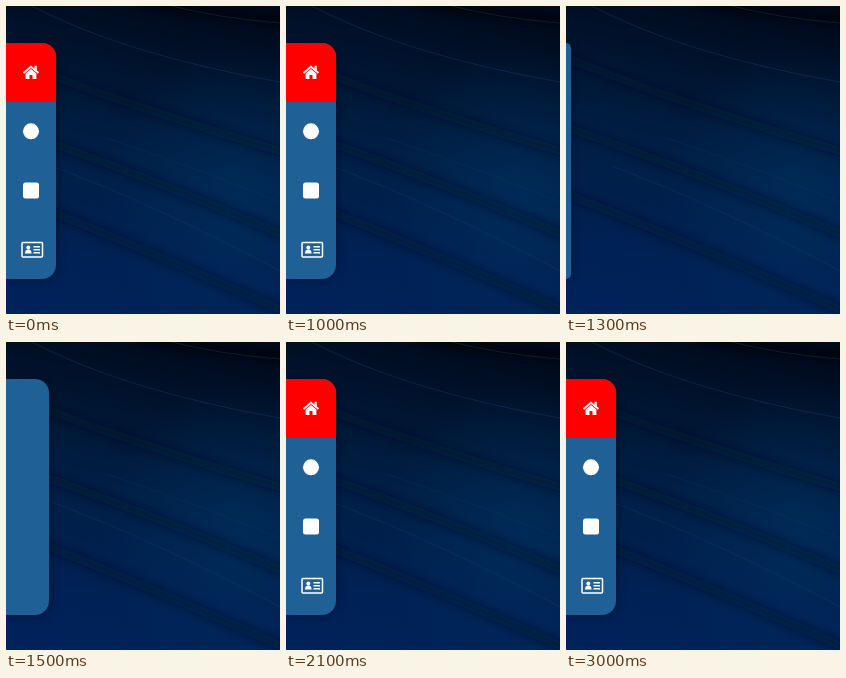
Animation of 274x308 px, one loop 3200 ms. Source, as an HTML page:

```html
<!DOCTYPE html>
<html lang="en">
<head>
<meta charset="utf-8">
<title>Sidebar</title>
<style>
  html, body { margin: 0; width: 100%; height: 100%; overflow: hidden; background: #fefefe; }
  #page { position: absolute; left: 0; top: 0; width: 274px; height: 308px; overflow: hidden; }
  svg { position: absolute; left: 0; top: 0; }
  #bar {
    position: absolute; left: 0; top: 37px; width: 50px; height: 236px; overflow: hidden;
    border-radius: 0 14px 14px 0; background: #1f6096; box-shadow: 0 0 9px rgba(0, 8, 28, .6);
  }
</style>
</head>
<body>
<div id="page">
  <svg width="274" height="308">
    <defs>
      <linearGradient id="sky" x1=".6" y1="0" x2=".42" y2="1">
        <stop offset="0" stop-color="#000a1c"/>
        <stop offset=".22" stop-color="#00142f"/>
        <stop offset=".5" stop-color="#001f45"/>
        <stop offset="1" stop-color="#00225a"/>
      </linearGradient>
      <radialGradient id="glow" cx=".86" cy=".62" r=".5">
        <stop offset="0" stop-color="#003262" stop-opacity=".6"/>
        <stop offset="1" stop-color="#003262" stop-opacity="0"/>
      </radialGradient>
      <filter id="soft" x="-20%" y="-20%" width="140%" height="140%"><feGaussianBlur stdDeviation="4"/></filter>
    </defs>
    <rect width="274" height="308" fill="url(#sky)"/>
    <rect width="274" height="308" fill="url(#glow)"/>
    <g fill="none" filter="url(#soft)" stroke="#000e2c" stroke-opacity=".55" stroke-width="9">
      <path d="M-10 48Q120 100 284 148"/>
      <path d="M-10 118Q130 165 284 232"/>
      <path d="M-10 184Q110 230 284 308"/>
      <path d="M130 -4Q200 8 284 14" stroke="#00040c"/>
    </g>
    <g fill="none" stroke="#2b5078" stroke-opacity=".3">
      <path d="M20 -3Q115 48 274 76"/>
      <path d="M158 -2Q210 12 274 17"/>
      <path d="M46 160Q150 199 274 265" stroke-opacity=".2"/>
      <path d="M100 132Q180 158 274 196" stroke-opacity=".12"/>
    </g>
  </svg>
  <div id="bar">
    <svg id="menu" width="50" height="236" fill="#fff">
      <rect width="50" height="59" fill="#f00"/>
      <path d="M17.5 30 25 23.7 32.5 30" fill="none" stroke="#fff" stroke-width="1.8"/>
      <path d="M28.5 22.8h2.3v5h-2.3zM19.6 30.4 25 25.9l5.4 4.5V36h-3.9v-4h-3v4h-3.9z"/>
      <circle cx="25" cy="88.3" r="8"/>
      <rect x="17" y="139.500" width="16" height="16" rx="2.500"/>
      <rect x="16" y="199.500" width="20.500" height="14.500" rx="1" fill="none" stroke="#fff" stroke-width="1.500"/>
      <circle cx="22.300" cy="204.500" r="2"/>
      <path d="M19 210.500q0-4 3.300-4t3.300 4zM27.500 203h6.500v1.500h-6.500zM27.500 206h6.500v1.500h-6.500zM27.500 209h6.500v1.500h-6.500z"/>
    </svg>
  </div>
</div>
<script>
  const LOOP = 3200, BLANK = 1200, RELOAD = 1300;
  const [page, bar, menu] = ['page', 'bar', 'menu'].map(id => document.getElementById(id));
  const clamp = x => Math.min(1, Math.max(0, x));

  // cubic-bezier(.25, .1, .25, 1), solved by bisection
  function ease(x) {
    const curve = (a, b, s) => 3 * a * s * (1 - s) ** 2 + 3 * b * s * s * (1 - s) + s ** 3;
    let lo = 0, hi = 1;
    for (let i = 0; i < 20; i++) {
      const mid = (lo + hi) / 2;
      if (curve(.25, .25, mid) < x) lo = mid; else hi = mid;
    }
    return curve(.1, 1, hi);
  }
  const progress = (t, start, length) => ease(clamp((t - start) / length));

  function draw(now) {
    const t = now % LOOP, settled = t < BLANK;
    page.style.visibility = !settled && t < RELOAD ? 'hidden' : 'visible';
    bar.style.width = 50 * (settled ? 1 : progress(t, 1257, 430)) + 'px';
    menu.style.opacity = settled ? 1 : progress(t, 1700, 350);
    requestAnimationFrame(draw);
  }
  draw(0);
</script>
</body>
</html>
```
